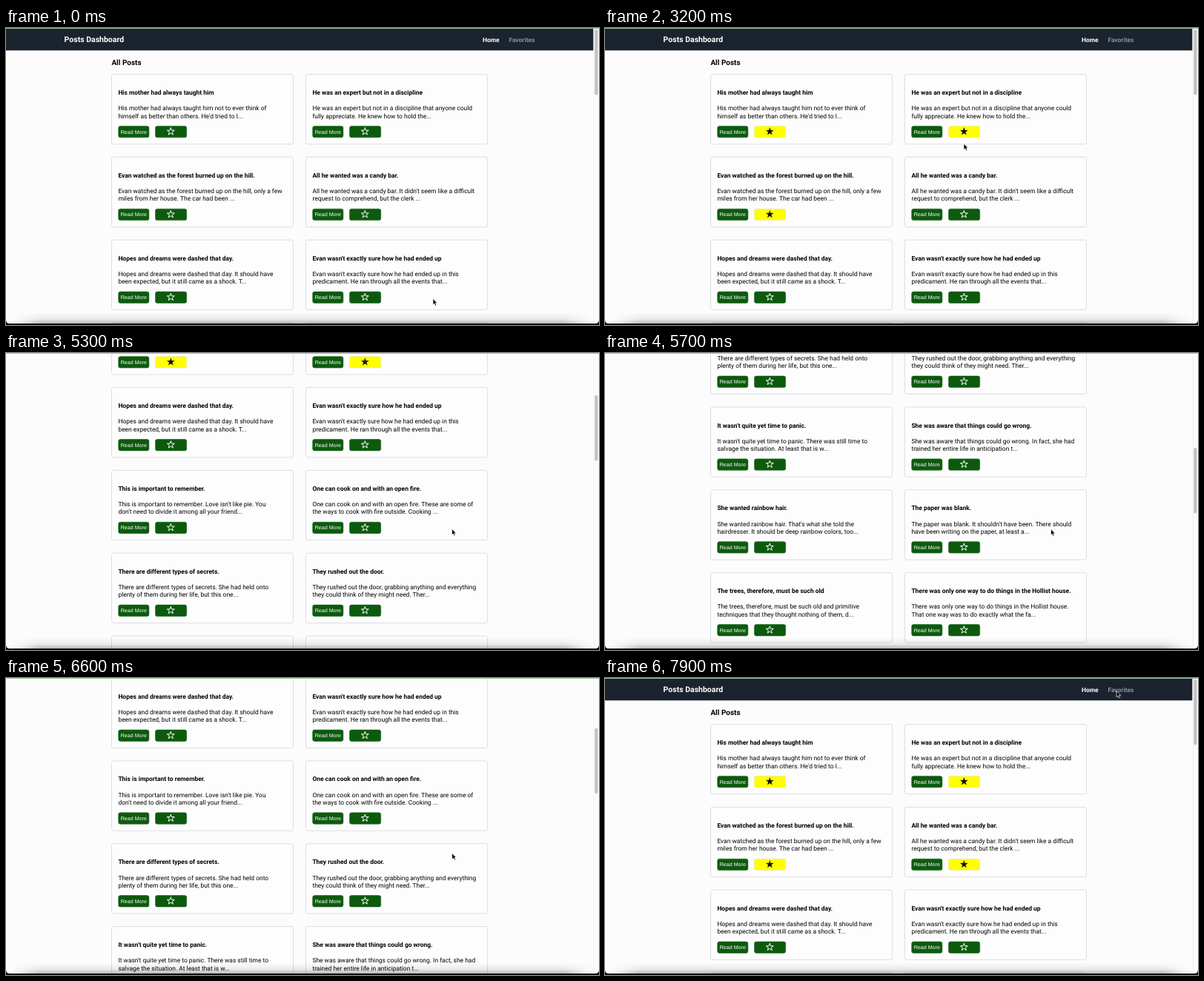
Recreate the animation shown at these times as an HTML page. Size 800 by 401 pixels, loop 8 s.

```html
<!DOCTYPE html>
<html lang="en">
<head>
<meta charset="utf-8">
<title>Posts Dashboard</title>
<style>
  html, body { margin: 0; width: 100%; height: 100%; overflow: hidden; background: #fcfcfc; }
  svg { display: block; width: 100vw; height: 100vh; }
  text { font: 8.45px Roboto, sans-serif; fill: #000; text-rendering: geometricPrecision; white-space: pre; }
  .bold { font-weight: 700; }
  .brand { font-size: 10.5px; fill: #fff; }
  .heading { font-size: 10px; }
  .label { font: 7.1px "Liberation Sans", Arial, sans-serif; fill: #fff; }
  .card { fill: #fdfdfd; stroke: #dedede; }
  .button { fill: #0d5a0f; stroke: #1d6b1f; stroke-width: .6; }
  .star { fill: none; stroke: #fff; stroke-width: 1; }
  .on .button { fill: #ff0; stroke: #e6e6b0; }
  .on .star { fill: #111; stroke: #111; stroke-width: .3; }
</style>
</head>
<body>
<svg viewBox="0 0 800 401" preserveAspectRatio="none">
  <defs>
    <linearGradient id="shade" x2="0" y2="1">
      <stop offset="0" stop-color="#000" stop-opacity="0"/>
      <stop offset=".6" stop-color="#000" stop-opacity=".07"/>
      <stop offset="1" stop-color="#000" stop-opacity=".27"/>
    </linearGradient>
    <linearGradient id="sides">
      <stop offset="0" stop-color="#000"/>
      <stop offset=".05" stop-color="#fff"/>
      <stop offset=".95" stop-color="#fff"/>
      <stop offset="1" stop-color="#000"/>
    </linearGradient>
    <mask id="fade"><rect x="8" y="380" width="784" height="21" fill="url(#sides)"/></mask>
  </defs>
  <rect width="800" height="401" fill="#fcfcfc"/>
  <g id="page">
    <rect y="1" width="793" height="29.3" fill="#1b232e"/>
    <text class="bold brand" x="78.6" y="19.4">Posts Dashboard</text>
    <text class="bold" x="643" y="18.9" style="fill:#fff">Home</text>
    <text class="bold" x="678.4" y="18.9" style="fill:#8b9096">Favorites</text>
    <text class="bold heading" x="142.4" y="49.6">All Posts</text>
  </g>
  <rect x="792.5" y="1" width="7.5" height="399" fill="#fafafa"/>
  <path d="M792.8 1V400" stroke="#e7e7e7" stroke-width=".6"/>
  <rect id="thumb" x="794.3" width="4.2" height="88.5" rx="2.1" fill="#c1c1c1"/>
  <rect width="800" height="1" fill="#9fc39f"/>
  <rect x="8" y="384" width="784" height="15" fill="url(#shade)" mask="url(#fade)"/>
  <path d="M0 394Q0 399 5 399H795Q800 399 800 394V401H0Z" fill="#0c0d0f"/>
  <g id="cursor">
    <path id="arrow" d="M0 0V8.2L1.9 6.5L3.2 9.4L4.7 8.7L3.4 5.9H5.8Z" fill="#000" stroke="#fff" stroke-width=".7"/>
    <path id="beam" d="M-2 -4Q0 -4 0 -3Q0 -4 2 -4M0 -3V3M-2 4Q0 4 0 3Q0 4 2 4" fill="none" stroke="#222" stroke-width=".9"/>
  </g>
</svg>
<script>
const LOOP = 8000, STEP = 100, ROW = 111.8;

// title, first line, second line
const posts = [
  ["His mother had always taught him", "His mother had always taught him not to ever think of", "himself as better than others. He'd tried to l..."],
  ["He was an expert but not in a discipline", "He was an expert but not in a discipline that anyone could", "fully appreciate. He knew how to hold the..."],
  ["Evan watched as the forest burned up on the hill.", "Evan watched as the forest burned up on the hill, only a few", "miles from her house. The car had been ..."],
  ["All he wanted was a candy bar.", "All he wanted was a candy bar. It didn't seem like a difficult", "request to comprehend, but the clerk ..."],
  ["Hopes and dreams were dashed that day.", "Hopes and dreams were dashed that day. It should have", "been expected, but it still came as a shock. T..."],
  ["Evan wasn't exactly sure how he had ended up", "Evan wasn't exactly sure how he had ended up in this", "predicament. He ran through all the events that..."],
  ["This is important to remember.", "This is important to remember. Love isn't like pie. You", "don't need to divide it among all your friend..."],
  ["One can cook on and with an open fire.", "One can cook on and with an open fire. These are some of", "the ways to cook with fire outside. Cooking ..."],
  ["There are different types of secrets.", "There are different types of secrets. She had held onto", "plenty of them during her life, but this one..."],
  ["They rushed out the door.", "They rushed out the door, grabbing anything and everything", "they could think of they might need. Ther..."],
  ["It wasn't quite yet time to panic.", "It wasn't quite yet time to panic. There was still time to", "salvage the situation. At least that is w..."],
  ["She was aware that things could go wrong.", "She was aware that things could go wrong. In fact, she had", "trained her entire life in anticipation t..."],
  ["She wanted rainbow hair.", "She wanted rainbow hair. That's what she told the", "hairdresser. It should be deep rainbow colors, too..."],
  ["The paper was blank.", "The paper was blank. It shouldn't have been. There should", "have been writing on the paper, at least a..."],
  ["The trees, therefore, must be such old", "The trees, therefore, must be such old and primitive", "techniques that they thought nothing of them, d..."],
  ["There was only one way to do things in the Hollist house.", "There was only one way to do things in the Hollist house.", "That one way was to do exactly what the fa..."],
  ["She was in a hurry.", "She was in a hurry. Not the standard hurry when you're in a", "rush to get someplace, but a frantic hur..."],
  ["She had a terrible habit o comparing her life to others", "She had a terrible habit o comparing her life to others. She", "realized that their life experiences we..."],
  ["The rain and wind abruptly stopped.", "The rain and wind abruptly stopped, but the sky still had the", "gray swirls of storms in the distance. ..."],
  ["He couldn't remember exactly where he had read it", "He couldn't remember exactly where he had read it, but he", "was sure that he had. The fact that she di..."],
  ["She wondered if the note had reached him.", "She wondered if the note had reached him. She scolded", "herself for not handing it to him in person. T..."],
  ["The lamp in the hallway was still on.", "The lamp in the hallway was still on. He had been certain", "that he switched it off before leaving th..."]
];

// post index -> time its star is clicked
const clicks = { 0: 1200, 2: 2000, 1: 2900, 3: 3700 };

// time, x, y
const cursorKeys = [
  [0, 576, 365.5], [300, 181, 170], [600, 181, 170], [900, 222, 138], [1400, 222, 138],
  [1800, 222.5, 244.5], [2200, 222.5, 246], [2700, 484, 139], [3100, 484, 139],
  [3500, 484, 249], [3900, 484, 249], [4400, 593, 250.5], [4800, 593, 250.5],
  [5100, 601.5, 237.5], [6300, 601.5, 238], [7000, 602, 234.5], [7400, 602, 234.5], [7900, 690, 17.5]
];

// time, offset
const scrollKeys = [
  [4900, 0], [5000, 12], [5100, 85], [5700, 548.5], [5900, 750], [6000, 790], [6200, 718],
  [6800, 70], [6900, -8], [7000, -28.5], [7100, -15], [7200, -6], [7400, 0]
];

const linear = p => p;
const smooth = p => p * p * (3 - 2 * p);
const $ = id => document.getElementById(id);

function sample(keys, t, ease) {
  const next = keys.findIndex(k => k[0] > t);
  if (next === 0) return keys[0].slice(1);
  if (next < 0) return keys[keys.length - 1].slice(1);
  const a = keys[next - 1], b = keys[next];
  const p = ease((t - a[0]) / (b[0] - a[0]));
  return a.slice(1).map((v, i) => v + (b[i + 1] - v) * p);
}

const starPoints = Array.from({ length: 10 }, (_, i) => {
  const r = i % 2 ? 2.1 : 5.2, angle = (i / 5 - .5) * Math.PI;
  return `${(r * Math.cos(angle)).toFixed(2)},${(r * Math.sin(angle)).toFixed(2)}`;
}).join(" ");

function card([title, line1, line2], i) {
  const x = 142.5 + (i % 2) * 262, y = 62.5 + Math.floor(i / 2) * ROW;
  return `<g transform="translate(${x} ${y})">
    <rect class="card" width="245" height="94.3" rx="2.5"/>
    <text class="bold" x="8.9" y="27.6">${title}</text>
    <text x="8.9" y="48.9">${line1}</text>
    <text x="8.9" y="59">${line2}</text>
    <rect class="button" x="9.2" y="69.9" width="41.2" height="15.4" rx="2.6"/>
    <text class="label" x="29.8" y="80.1" text-anchor="middle">Read More</text>
    <g id="favorite${i}">
      <rect class="button" x="59" y="69.9" width="42.2" height="15.4" rx="2.6"/>
      <polygon class="star" points="${starPoints}" transform="translate(79.8 77.3)"/>
    </g>
  </g>`;
}

$("page").insertAdjacentHTML("beforeend", posts.map(card).join(""));

function draw(now) {
  const t = Math.floor(now % LOOP / STEP) * STEP;
  const [scroll] = sample(scrollKeys, t, linear);
  const [x, y] = sample(cursorKeys, t, smooth);
  const overText = t >= 6100 && t < 6600;

  $("page").setAttribute("transform", `translate(0 ${-scroll})`);
  $("thumb").setAttribute("y", 2 + Math.max(0, scroll) * .2297);
  $("cursor").setAttribute("transform", `translate(${x} ${y})`);
  $("arrow").style.display = overText ? "none" : "";
  $("beam").style.display = overText ? "" : "none";
  for (const i in clicks) $("favorite" + i).classList.toggle("on", t >= clicks[i]);
}

const start = performance.now();
function tick() {
  draw(performance.now() - start);
  requestAnimationFrame(tick);
}
tick();
</script>
</body>
</html>
```
